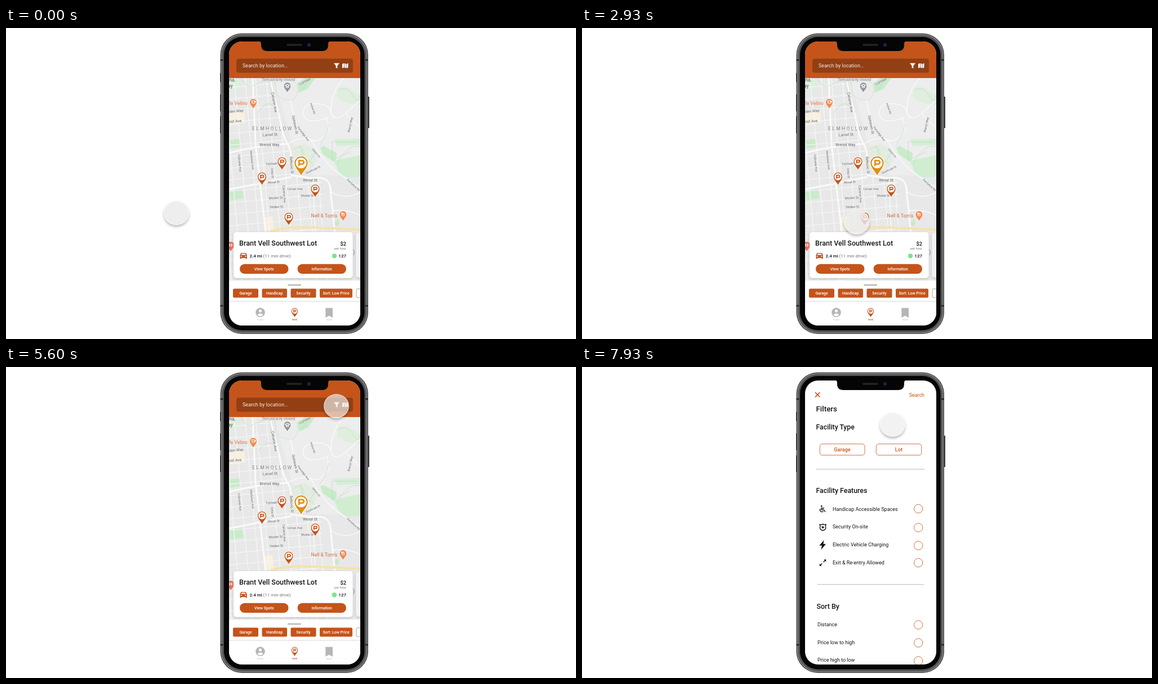
Recreate the animation shown at these times as an HTML page. Size 1012 px wide and 553 px high, loop 8000 ms.

```html
<!DOCTYPE html>
<html lang="en">
<head>
<meta charset="utf-8">
<title>Parking app</title>
<style>
html, body { margin: 0; width: 100%; height: 100%; overflow: hidden; background: #fff; }
#stage { position: absolute; left: 0; top: 0; width: 1012px; height: 553px; overflow: hidden; }
svg { display: block; font-family: Roboto, "Open Sans", sans-serif; }
#pointer { position: absolute; left: -22.5px; top: -21.5px; width: 45px; height: 43px; border-radius: 50%; }
</style>
</head>
<body>
<div id="stage">
<svg width="1012" height="553" viewBox="0 0 1012 553">
  <defs>
    <clipPath id="screen"><rect x="396" y="24" width="233" height="505" rx="23"/></clipPath>
    <clipPath id="blocks"><path d="M396 89H468L486 160L500 206L508 262L560 268L572 449H396Z"/></clipPath>
    <filter id="soft" x="-20%" y="-20%" width="140%" height="150%">
      <feDropShadow dx="0" dy="1.5" stdDeviation="2" flood-opacity=".2"/>
    </filter>
    <path id="drop" d="M0 15C-3 9-8 6-8 0A8 8 0 0 1 8 0C8 6 3 9 0 15Z"/>
  </defs>

  <rect x="641.5" y="122" width="3.5" height="56" rx="1" fill="#3c3c3e"/>
  <rect x="380.5" y="9.5" width="262.5" height="534.5" rx="38" fill="#4a4a4c"/>
  <rect x="382.8" y="11.8" width="257.9" height="529.9" rx="36" fill="none" stroke="#858588" stroke-width="1.6"/>
  <rect x="385.2" y="14.2" width="253.1" height="525.1" rx="34" fill="none" stroke="#58585b" stroke-width="2"/>
  <path d="M380.5 57h5M638 57h5M380.5 494h5M638 494h5" stroke="#232325" stroke-width="2.4"/>
  <path d="M381 80v16M381 118v30M381 157v30" stroke="#222224" stroke-width="1.6"/>
  <rect x="387" y="16" width="249.5" height="521.5" rx="32" fill="#050505"/>

  <g clip-path="url(#screen)">
    <g id="home">
      <rect x="396" y="24" width="233" height="505" fill="#fff"/>
      <rect x="396" y="89" width="233" height="360" fill="#e8e8e8"/>
      <path d="M476 89H629V250L600 262L545 262L508 206Z" fill="#ededed"/>
      <g fill="#c9ebca">
        <path d="M517 99L530 89H549L536 108L520 115Z"/>
        <path d="M589 107L603 104L629 119V137L606 134L588 125Z" fill="#e0eedf"/>
        <path d="M396 200L414 197L417 212L396 215Z"/>
        <path d="M396 290L418 286L422 303L398 307Z"/>
        <path d="M396 94L414 91L419 106L398 112Z" fill="#dcefdb"/>
        <path d="M558 213Q562 207 571 214L587 222Q588 232 582 238L563 225Z"/>
        <path d="M583 198L629 197V208L588 210Z" fill="#d5eed6"/>
        <path d="M582 236L605 231L629 226V264L607 266Q598 262 591 257Z" fill="#d0edd1"/>
        <path d="M508 211L530 207L548 216L551 236L535 258L512 256Z" fill="#e2ece1"/>
        <path d="M580 346L590 340L592 349L584 354Z"/>
      </g>
      <path d="M396 152L423 148L425 169L398 174ZM457 337L473 334L476 358L459 361Z" fill="#f8f0de"/>
      <path d="M478 96Q499 86 517 99Q520 120 510 128Q486 130 480 114Z" fill="#ebeceb" stroke="#b9deb9" stroke-dasharray="2 1.3"/>
      <g id="grid" clip-path="url(#blocks)" stroke="#f8f8f8" stroke-width="1.2" fill="none"/>
      <g fill="none" stroke="#fafafa" stroke-linejoin="round">
        <path d="M396 222Q450 208 500 206M468 89L486 160Q490 190 500 206Q509 220 507 262L545 267Q573 262 576 285Q580 330 584 362" stroke-width="3"/>
        <path d="M438 89L443 205L461 362M396 287L507 265" stroke-width="3"/>
        <path d="M500 206Q523 192 541 199T574 180L570 160Q536 172 529 157T543 135Q573 132 577 150T603 152L629 128M505 128L516 180L541 199M541 199Q556 225 572 242T629 284M576 290Q600 308 629 292M580 325Q606 322 629 333M600 89Q577 112 577 148M603 152L629 178M545 267L549 362" stroke-width="1.5"/>
      </g>
      <g fill="none" stroke="#a9d9ae" stroke-width="1" stroke-dasharray="2 1.3">
        <path d="M418 89Q425 112 449 98T470 119M448 150Q467 122 479 146M511 216Q528 203 529 230T550 218M513 250Q535 226 548 246M523 209L531 257M581 203H624M579 200L579 236L611 220M591 111Q606 102 616 120T629 118M533 97L526 110M557 209Q570 190 574 170M588 242Q606 205 629 211"/>
      </g>
      <path d="M470 362Q490 355 520 354.500T629 359" fill="none" stroke="#f5e2ac" stroke-width="4"/>
      <g id="mapText"></g>
      <g id="places"></g>
      <g id="pins"></g>

      <rect x="396" y="24" width="233" height="65" fill="#c4541a"/>
      <rect x="409" y="54.5" width="207" height="25" rx="4" fill="#933f14"/>
      <path d="M582 62.5H592L588.4 67V72L585.6 70.2V67Z" fill="#fff"/>
      <path d="M597 64L600 62.6V70.2L597 71.6ZM600.8 62.6L603.6 64V71.6L600.8 70.2ZM604.4 64L607.4 62.6V70.2L604.4 71.6Z" fill="#fff"/>

      <rect x="621.5" y="364" width="30" height="80" rx="5" fill="#f2f3f4" filter="url(#soft)"/>
      <path d="M616.5 394Q620 399 616.5 404" fill="none" stroke="#888"/>
      <rect x="396" y="449" width="233" height="80" fill="#fff"/>
      <rect x="404" y="363" width="211.5" height="81.5" rx="5" fill="#fff" filter="url(#soft)"/>
      <path d="M415.5 404L417.3 400H426L427.8 404V410.5H425.6V409H417.7V410.5H415.5Z" fill="#c4541a"/>
      <path d="M417.5 403.5L418.6 401.3H424.7L425.8 403.5Z" fill="#fff"/>
      <path d="M417 406h2M424.3 406h2" stroke="#fff" stroke-width="1.5"/>
      <circle cx="583" cy="405.3" r="4.2" fill="#7ee48d"/>
      <rect x="500" y="455.7" width="24" height="2.6" rx="1.3" fill="#b9b9bb"/>
      <g id="controls" fill="#c4541a"></g>
      <rect x="622" y="463.8" width="40" height="15.4" rx="2" fill="#fff" stroke="#a58a7d" stroke-width=".8"/>
      <path d="M396 486H629" stroke="#d7d7d9"/>
      <circle cx="451.5" cy="505.8" r="8.3" fill="#b6b6b8"/>
      <circle cx="451.5" cy="503" r="2.6" fill="#fff"/>
      <path d="M446.3 510Q451.5 505 456.7 510Q451.5 515 446.3 510Z" fill="#fff"/>
      <path d="M567.3 498.5Q567.3 497.8 568 497.8H579.3Q580 497.8 580 498.5V515L573.6 511.8L567.3 515Z" fill="#b6b6b8"/>
      <g id="homeText"></g>
    </g>

    <g id="filters">
      <rect x="396" y="24" width="233" height="505" fill="#fff"/>
      <path d="M414 45L422.3 53.3M422.3 45L414 53.3" stroke="#c4541a" stroke-width="1.7"/>
      <g fill="none" stroke="#cf7147" stroke-width="1">
        <rect x="422.3" y="136.8" width="79.7" height="20" rx="4.5"/>
        <rect x="522.3" y="136.8" width="80.5" height="20" rx="4.5"/>
        <g id="radios"></g>
      </g>
      <path d="M416 181.7H608M418 386.7H607" stroke="#c6c6c8" stroke-width="1.2"/>
      <g fill="none" stroke="#111" stroke-width="1.4">
        <circle cx="425.3" cy="247.3" r="1" fill="#111" stroke-width=".8"/>
        <path d="M425.5 249.5V254H429.5L432 258M425.5 251H430M423.5 252A3.4 3.4 0 1 0 428.6 256.5"/>
        <path d="M422.3 280Q425 281 427.6 279.3Q430.2 281 433 280L432.3 283.5Q434.5 289 427.6 290.7Q420.8 289 422.9 283.5Z"/>
        <path d="M423 352.5L426.3 349.3M428.6 347L432 343.6"/>
      </g>
      <path id="star" fill="#111"/>
      <path d="M429.5 308L421.3 317.6H426L424.4 325L433 314.8H428.4Z" fill="#111"/>
      <path d="M429.3 342.3H433.3V346.3ZM421.8 349.8V353.8H425.8Z" fill="#111"/>
      <g id="filterText"></g>
    </g>
  </g>

  <path d="M449 23Q453 24 453 28V30Q453 41 464 41H561Q572 41 572 30V28Q572 24 576 23Z" fill="#050505"/>
  <rect x="498" y="28.2" width="28" height="3.6" rx="1.8" fill="#242426"/>
  <circle cx="538" cy="30" r="3.5" fill="#15182e"/>
  <circle cx="538" cy="30" r="1.5" fill="#2a3263"/>
</svg>
<div id="pointer"></div>
</div>

<script>
const LOOP = 8000, LEAVE = 1950, SWITCH = 5870, ORANGE = "#c4541a", INK = "#161616";
const $ = id => document.getElementById(id);
const add = (id, markup) => $(id).insertAdjacentHTML("beforeend", markup);

function label(id, str, x, y, size, color = INK, weight = 400, anchor = "start", extra = "") {
  add(id, `<text x="${x}" y="${y}" font-size="${size}" fill="${color}" font-weight="${weight}" text-anchor="${anchor}" ${extra}>${str}</text>`);
}

// Street grid
let streets = "";
for (let i = -1; i < 10; i++) streets += `M${386 + 19 * i} 89l33 360`;
for (let i = 0; i < 18; i++) streets += `M396 ${106 + 20.5 * i}l180 -17`;
add("grid", `<path d="${streets}"/>`);

// Street names: text, centre x, y, angle, size
[
  ["Larvel St", 469, 190, -3, 6.8], ["Brenot Way", 468, 208, 0, 6.8],
  ["Calverin Ave", 476, 132, 80, 6.6], ["Ostreven St", 513, 172, 78, 6.6],
  ["Belkono St", 507, 244, 86, 6.4], ["Wexal St", 540, 271, 0, 6.8],
  ["Tomsen St", 475, 241, -4, 5.8], ["Wexal St", 475, 274, -4, 5.6],
  ["Linvar Ave", 513, 286, 0, 5.8], ["Mosler St", 479, 302, -3, 5.8],
  ["Mosler St", 535, 298, 0, 5.2], ["Yelden St", 480, 318, -2, 5.8],
  ["Calverin Ave", 494, 295, 86, 5.6], ["Orba St", 473, 258, 85, 5.4],
  ["Tullivane Ave", 415, 240, 84, 5.4], ["Marlowen Ave", 437, 235, 84, 5.4],
  ["Fennidge Ave", 528, 188, 52, 5.2], ["Brenot Way", 611, 172, -78, 5.4],
  ["Imbrel Rd", 545, 143, 72, 4.8], ["Uplorn Ct", 551, 222, 52, 4.8],
  ["Southvale Pl", 545, 252, -24, 5], ["Penfallow Rd", 617, 279, 42, 5],
  ["Lomber", 531, 95, -26, 6.6], ["lden Way", 408, 148, -5, 6.8],
  ["ost Ave", 407, 166, -4, 6.8]
].forEach(([s, x, y, a, size]) => label("mapText", s, x, y + 2, size, "#5c6063", 400, "middle",
  `transform="rotate(${a} ${x} ${y})" stroke="#f2f2f2" stroke-width="1" paint-order="stroke"`));
label("mapText", "na,", 396, 95, 8.5, "#55585b");
label("mapText", "ay", 394, 105.5, 8.5, "#55585b");
label("mapText", "Temporarily closed", 484, 94, 7, "#85898c", 400, "middle");
label("mapText", "ELMHOLLOW", 437, 181.5, 8.5, "#85898c", 400, "start", 'letter-spacing="2.4"');
label("mapText", "fe Velino", 396, 137, 8.5, "#dc7c50");
label("mapText", "Nell &amp; Tom's", 541.5, 337, 8.6, "#cf6d45");

// Map places and parking pins
const place = (x, y, color, glyph) => add("places",
  `<g transform="translate(${x} ${y})"><use href="#drop" transform="scale(.8)" fill="${color}" stroke="#fff"/>
  <path d="${glyph}" fill="none" stroke="#fff" stroke-width="1.2"/></g>`);
place(439, 132, "#ee8a55", "M-2.5 -2.5H2.5L1.8 2H-1.8ZM2.5 -1.5h1.3v2h-1.5");
place(499.5, 103, "#8f9598", "M-4 -1L0 -3L4 -1L0 1ZM-2 1V3H2V1");
place(598.5, 331.5, "#ee8a55", "M-1.5 -3V3.5M1.5 3.5V-3M-2.5 -3V-1H-.5V-3");
place(399, 386, "#e2705c", "M-2 -3V3M2 -3V3M-2 0H2");

function pin(id, x, y, scale, color) {
  add(id, `<g transform="translate(${x} ${y}) scale(${scale})">
    <use href="#drop" fill="${color}" stroke="#fff" stroke-width=".8"/><circle r="6.2" fill="#fff"/>
    <path d="M-2.4 3.6V-2.6H1.2A1.9 1.9 0 0 1 1.2 1.2H-2.4" fill="none" stroke="${color}" stroke-width="1.8"/></g>`);
}
[[490, 237.5], [454.5, 264.5], [549, 286], [502, 336]].forEach(([x, y]) => pin("pins", x, y, 1, ORANGE));
pin("pins", 524, 240, 1.55, "#df8f14");

// Card, chips and tabs
function button(text, x, y, w, h, r, base) {
  add("controls", `<rect x="${x}" y="${y}" width="${w}" height="${h}" rx="${r}"/>`);
  label("homeText", text, x + w / 2, base, 6.95, "#fff", 500, "middle");
}
button("View Spots", 415, 419.8, 86.5, 17.2, 8.6, 431);
button("Information", 517.5, 419.8, 86.5, 17.2, 8.6, 431);
[["Garage", 403, 45], ["Handicap", 454.5, 44.5], ["Security", 505.5, 45], ["Sort: Low Price", 557, 58]]
  .forEach(([s, x, w]) => button(s, x, 463.5, w, 16, 2, 474));
label("homeText", "Search by location...", 420, 70, 9.05, "#f6e9e2");
label("homeText", "Brant Vell Southwest Lot", 414, 386.5, 12.55, INK, 500);
label("homeText", "$2", 604, 386.5, 9.2, INK, 500, "end");
label("homeText", "per hour", 604, 393.5, 5.7, "#77797b", 400, "end");
label("homeText", "2.4 mi", 432.5, 408.2, 8, INK, 500);
label("homeText", "(11 min drive)", 456.5, 408.2, 8, "#707274");
label("homeText", "127", 604, 408.2, 8, INK, 500, "end");
label("homeText", "Profile", 451.5, 520, 3.8, "#b6b6b8", 400, "middle");
label("homeText", "PARK", 512.5, 520, 3.6, ORANGE, 500, "middle");
label("homeText", "Saved", 573.6, 520, 3.8, "#b6b6b8", 400, "middle");
pin("homeText", 512.5, 503.5, .74, ORANGE);

// Filter screen
label("filterText", "Search", 608, 53.3, 8.9, ORANGE, 400, "end");
[["Filters", 415.5, 79, 13.4], ["Facility Type", 415.5, 111, 12.3],
 ["Facility Features", 415.5, 224.3, 12.4], ["Sort By", 416.5, 430, 12.4]]
  .forEach(([s, x, y, size]) => label("filterText", s, x, y, size, INK, 500));
label("filterText", "Garage", 462, 150, 9.2, ORANGE, 500, "middle");
label("filterText", "Lot", 562.5, 150, 9.2, ORANGE, 500, "middle");
[["Handicap Accessible Spaces", 445, 255.5, 252], ["Security On-site", 445, 287.2, 285.5],
 ["Electric Vehicle Charging", 445, 318.8, 317.5], ["Exit &amp; Re-entry Allowed", 445, 350.5, 348],
 ["Distance", 418, 460.7, 458.5], ["Price low to high", 418, 492.5, 490.5],
 ["Price high to low", 418, 524, 522.5]].forEach(([s, x, y, cy]) => {
  label("filterText", s, x, y, 9);
  add("radios", `<circle cx="597.2" cy="${cy}" r="7.7"/>`);
});
$("star").setAttribute("d", "M" + Array.from({ length: 10 }, (_, i) => {
  const r = i % 2 ? 1.3 : 3.2, a = i * Math.PI / 5;
  return `${(427.6 + r * Math.sin(a)).toFixed(2)} ${(285 - r * Math.cos(a)).toFixed(2)}`;
}).join("L") + "Z");

// Pointer path: time, x, y, velocity x and y (px/s), opacity
const path = [
  [0, 302, 328.5, 0, 0, .9],
  [LEAVE, 302, 328.5, 0, 0, .9],
  [2930, 487, 345, 100, -90, .8],
  [4000, 567, 143, 40, -150, .85],
  [4930, 590, 71, 0, 0, .68],
  [5270, 586, 69, 0, 0, .68],
  [SWITCH - 1, 586, 69, 0, 0, .68],
  [SWITCH, 586, 69, 0, 0, 1],
  [7030, 586, 69, 0, 0, 1],
  [7930, 551, 102, -117, 110, .7],
  [LOOP, 551, 102, 0, 0, .7]
];

function hermite(p0, v0, p1, v1, u, sec) {
  const u2 = u * u, u3 = u2 * u, s = 3 * u2 - 2 * u3;
  return p0 + (p1 - p0) * s + ((u3 - 2 * u2 + u) * v0 + (u3 - u2) * v1) * sec;
}

function pointerAt(t) {
  const i = Math.max(1, path.findIndex(k => k[0] > t));
  const a = path[i - 1], b = path[i];
  const held = a[1] === b[1] && a[2] === b[2];
  const sec = (b[0] - a[0]) / 1000, u = (t - a[0]) / (b[0] - a[0]);
  return {
    x: held ? a[1] : hermite(a[1], a[3], b[1], b[3], u, sec),
    y: held ? a[2] : hermite(a[2], a[4], b[2], b[4], u, sec),
    alpha: a[5] + (b[5] - a[5]) * u
  };
}

const pointer = $("pointer");
function draw(t) {
  const { x, y, alpha } = pointerAt(t);
  // The resting shadow builds up until the pointer leaves
  const k = t < LEAVE ? (1 - Math.exp(-t / 800)) / .9 : 0;
  pointer.style.transform = `translate(${x}px, ${y}px)`;
  pointer.style.background = `rgba(237,237,238,${alpha})`;
  pointer.style.boxShadow =
    `0 ${3 + .4 * k}px ${4.5 - 2.5 * k}px ${.9 * k}px rgba(0,0,0,${.27 + .73 * k}), ` +
    `inset 0 ${1.5 * k}px ${2 * k}px 1.2px rgba(255,255,255,${.35 + .4 * k})`;
  $("home").style.display = t < SWITCH ? "" : "none";
  $("filters").style.display = t < SWITCH ? "none" : "";
}

const start = performance.now();
function tick() {
  draw((performance.now() - start) % LOOP);
  requestAnimationFrame(tick);
}
tick();
</script>
</body>
</html>
```
